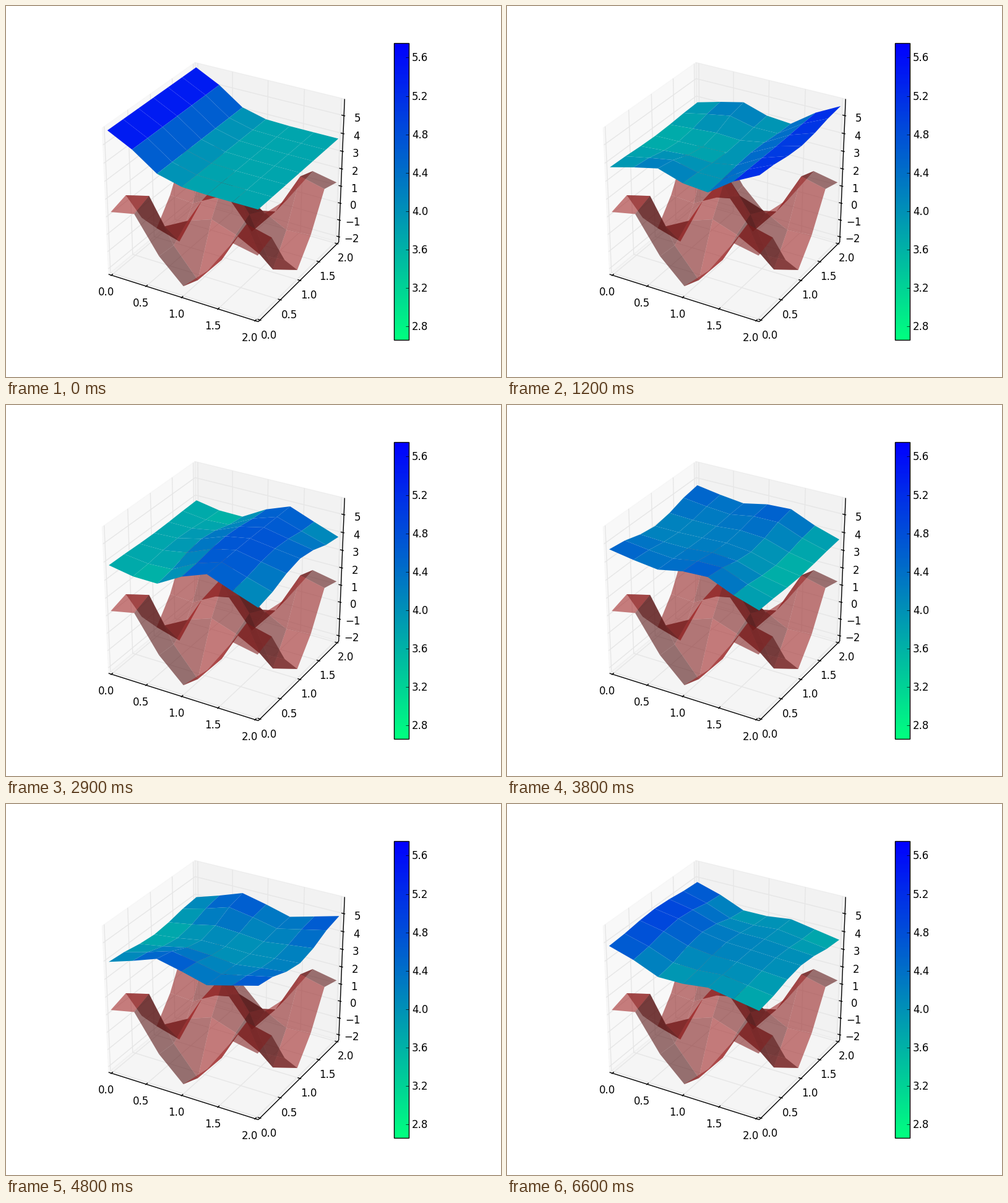
These frames come from a looping animation (800x600 px, 6700 ms). A matplotlib script:

```python
import numpy as np
import matplotlib.pyplot as plt
from matplotlib.animation import FuncAnimation
from matplotlib.collections import LineCollection, PolyCollection
from matplotlib.colors import to_rgb

W, H, FRAMES = 800, 600, 67
Z_LOW, Z_HIGH = -2.165, 5.751
C_LOW, C_HIGH = 2.658, 5.751
PAD = 1 / 48            # gap between the data and the walls

plt.rcParams["font.family"] = "DejaVu Sans"
plt.rcParams["font.size"] = 12


def project(x, y, z):
    """Unit-cube point -> stage pixels and nearness to the camera."""
    a, b, c = x - 0.5, y - 0.5, z - 0.5
    az, el = np.radians(-60), np.radians(30)
    u = -np.sin(az) * a + np.cos(az) * b
    flat = np.cos(az) * a + np.sin(az) * b
    v = -np.sin(el) * flat + np.cos(el) * c
    n = np.cos(el) * flat + np.sin(el) * c
    px = 100 + 496 * (u / (10 - n) + 0.095) / 0.185
    py = 540 - 480 * (v / (10 - n) + 0.095) / 0.185
    return np.stack([px, py], -1), n


def pix(*p):
    return project(*np.array(p, float))[0]


def unit_z(z):
    return (z - Z_LOW) / (Z_HIGH - Z_LOW)


def cells(a):
    """Corner values of each cell, in order round the cell."""
    c = np.stack([a[:-1, :-1], a[1:, :-1], a[1:, 1:], a[:-1, 1:]], 2)
    return c.reshape(36, 4, *a.shape[2:])


# ---- height fields on a 7 x 7 grid, first index along x ----
s = np.linspace(0, 1, 7)
X, Y = np.meshgrid(s, s, indexing="ij")
bed = 2.5 * np.cos(1.25 * np.pi * (2 * X - 1)) * np.cos(1.25 * np.pi * (2 * Y - 1))
start = 3.75 + 2 * np.exp(-3.7 * (2 * X) ** 2)

LEVEL = 4.2
# standing waves: half waves along x and y, height, period, life, phase in turns
WAVES = [
    (1, 0, 0.62, 21.0, np.inf, 0),
    (2, 0, 0.40, 11.2, 100, 0),
    (3, 0, 0.45, 7.4, 80, 0),
    (3, 2, 0.25, 7.4, 80, 0),
    (0, 2, 0.28, 11.2, np.inf, -0.25),
    (1, 2, 0.12, 9.5, np.inf, -0.25),
]


def swell(t):
    z = np.full_like(X, LEVEL)
    for m, n, height, period, life, phase in WAVES:
        now = height * np.exp(-t / life) * np.cos(2 * np.pi * (t / period + phase))
        z += now * np.cos(m * np.pi * X) * np.cos(n * np.pi * Y)
    return z


def water(t):
    """The first hump melts quickly into the standing waves."""
    return swell(t) + (start - swell(0)) * np.exp(-t / 5)


def mesh(z):
    """Cell outlines in pixels and their back-to-front order."""
    pts, near = project(X, Y, unit_z(z))
    order = np.argsort(cells(near).mean(1), kind="stable")
    return cells(pts)[order], order


# ---- stage ----
fig = plt.figure(figsize=(W / 100, H / 100), dpi=100, facecolor="white")
ax = fig.add_axes([0, 0, 1, 1])


def lines(segs, color, width, z):
    ax.add_collection(LineCollection(segs, colors=color, linewidths=width, zorder=z),
                      autolim=False)


def label(x, y, text, ha="center"):
    ax.text(x, y + 6, text, ha=ha, va="baseline", color="black")


lo, hi = -PAD, 1 + PAD
walls = [
    ([(lo, lo, lo), (lo, hi, lo), (lo, hi, hi), (lo, lo, hi)], 0.95),
    ([(lo, hi, lo), (hi, hi, lo), (hi, hi, hi), (lo, hi, hi)], 0.90),
    ([(lo, lo, lo), (hi, lo, lo), (hi, hi, lo), (lo, hi, lo)], 0.925),
]
for corners, g in walls:
    ax.add_patch(plt.Polygon([pix(*c) for c in corners], facecolor=(g, g, g, 0.5),
                             edgecolor=(g, g, g, 0.5), linewidth=1, zorder=1))

OUT, IN, GAP, DROP = 0.1 / 12, 0.2 / 12, 0.06, 6
gridlines, ticks = [], []
for v in np.arange(0, 2.1, 0.5):
    p = v / 2
    gridlines += [[pix(p, lo, lo), pix(p, hi, lo), pix(p, hi, hi)],
                  [pix(hi, p, lo), pix(lo, p, lo), pix(lo, p, hi)]]
    ticks += [[pix(p, lo - OUT, lo), pix(p, lo + IN, lo)],
              [pix(hi + OUT, p, lo), pix(hi - IN, p, lo)]]
    for x, y in (pix(p, lo - GAP, lo - GAP), pix(hi + GAP, p, lo - GAP)):
        label(x, y + DROP, f"{v:.1f}")
for v in range(-2, 6):
    p = unit_z(v)
    gridlines.append([pix(lo, lo, p), pix(lo, hi, p), pix(hi, hi, p)])
    ticks.append([pix(hi + OUT, hi, p), pix(hi - IN, hi, p)])
    x, y = pix(hi + GAP, hi + GAP, p)
    label(x, y + DROP, str(v).replace("-", "\u2212"))
lines(gridlines, "0.9", 1, 2)
lines([[pix(lo, lo, lo), pix(hi, lo, lo)], [pix(hi, lo, lo), pix(hi, hi, lo)],
       [pix(hi, hi, lo), pix(hi, hi, hi)]] + ticks, "black", 1, 3)

# ---- colour bar ----
ax.imshow(np.linspace(1, 0, 256)[:, None], cmap="winter_r", vmin=0, vmax=1,
          extent=(627, 651, 540, 60), aspect="auto", interpolation="nearest", zorder=2)
ax.add_patch(plt.Rectangle((627, 60), 24, 480, fill=False, edgecolor="black",
                           linewidth=1, zorder=3))
for v in np.arange(2.8, 5.7, 0.4):
    y = 540 - 480 * (v - C_LOW) / (C_HIGH - C_LOW)
    lines([[(645.5, y), (651, y)]], "black", 0.5, 4)
    label(656, y, f"{v:.1f}", "left")

# ---- shaded, see-through bed ----
corner = cells(np.stack([2 * X, 2 * Y, bed], -1))
normal = np.cross(corner[:, 1] - corner[:, 0], corner[:, 2] - corner[:, 0])
normal /= np.linalg.norm(normal, axis=1, keepdims=True)
shade = normal @ [-1, -1, 0.5]
shade = 0.5 + 0.5 * (shade - shade.min()) / np.ptp(shade)
shapes, order = mesh(bed)
tint = shade[order, None] * to_rgb("brown")
ax.add_collection(PolyCollection(shapes, facecolors=tint, alpha=0.6, linewidths=0,
                                 zorder=5), autolim=False)

# ---- moving water ----
surface = PolyCollection([], cmap="winter_r", linewidths=0, zorder=6)
surface.set_clim(C_LOW, C_HIGH)
ax.add_collection(surface, autolim=False)

ax.set_xlim(0, W)
ax.set_ylim(H, 0)
ax.axis("off")


def draw(t):
    z = water(t)
    shapes, order = mesh(z)
    surface.set_verts(shapes)
    surface.set_array(cells(z).mean(1)[order])
    return [surface]


anim = FuncAnimation(fig, draw, frames=FRAMES, interval=100, repeat=True,
                     repeat_delay=0, init_func=lambda: draw(0))
plt.show()
```
